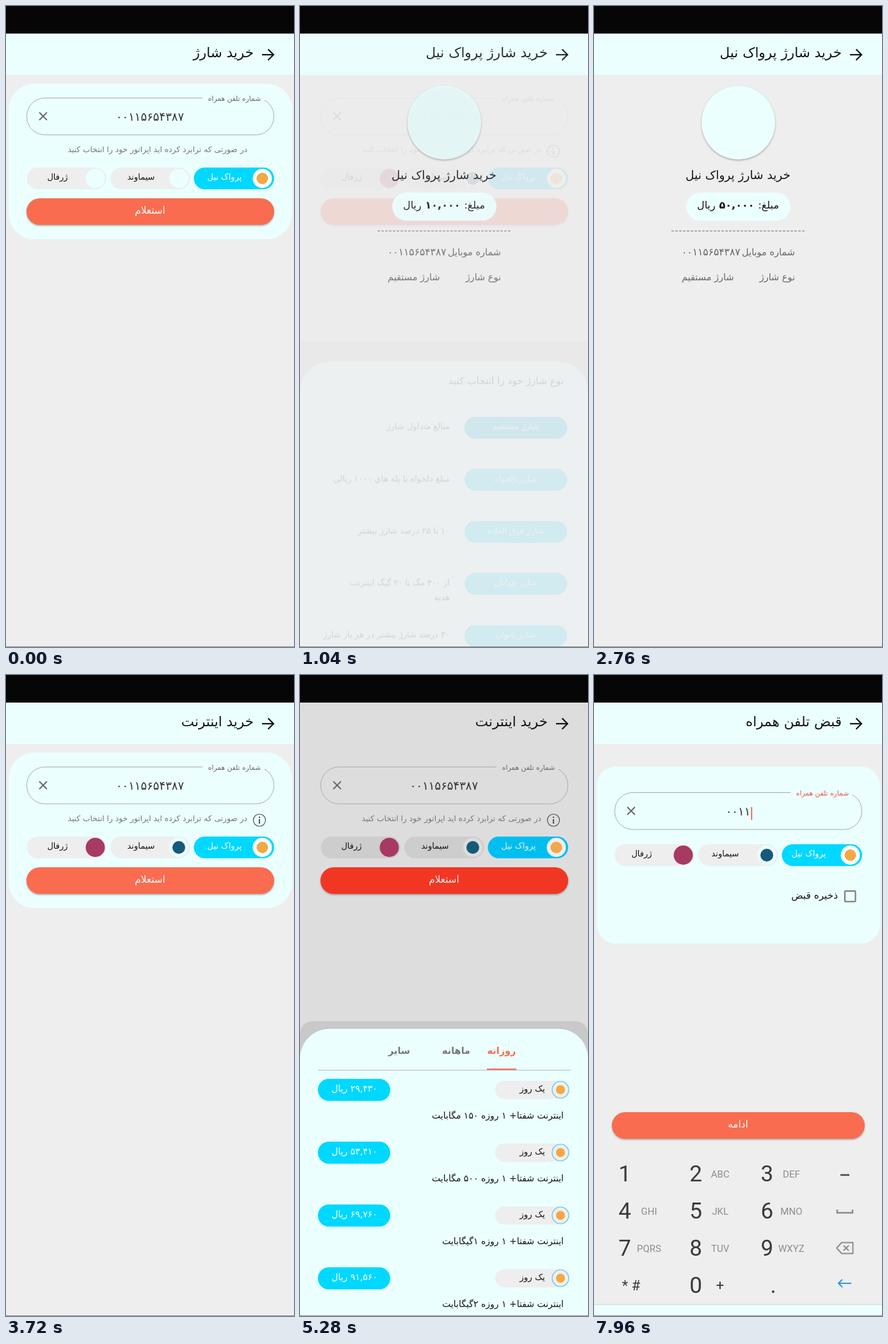
Animation of 450 by 1000 pixels, one loop 8 s. Source, as an HTML page with a canvas:

```html
<!DOCTYPE html>
<html lang="fa">
<head>
<meta charset="utf-8">
<style>
  html, body { margin: 0; height: 100%; overflow: hidden; background: #eee; }
  canvas { display: block; }
</style>
</head>
<body>
<canvas id="stage" width="450" height="1000"></canvas>
<script>
const ctx = document.getElementById('stage').getContext('2d');
const LOOP = 8000, CYAN = '#00d8ff', CORAL = '#f96c4f', AMBER = '#f2a845';
const PHONE = '۰۰۱۱۵۶۵۴۳۸۷', OPERATOR = 'پرواک نیل';

// Colours of a page at rest, behind a sheet, and behind a loader
const PLAIN = { surface: '#ebffff', ground: '#eeeeee', chip: '#eeeeee', accent: '#00d8ff', button: '#f96c4f', on: '#ffffff', ink: '#151515' };
const BEHIND = { surface: '#dddddd', ground: '#dddddd', chip: '#cdcdcd', accent: '#00bff0', button: '#f23624', on: '#eeeeee', ink: '#151515' };
const DARK = { surface: '#cccccc', ground: '#cccccc', chip: '#cccccc', accent: '#25b5d8', button: '#d2606e', on: '#dddddd', ink: '#333333' };
const BILL = { ...BEHIND, surface: '#eeeeee' };
const SHEET_DARK = { ...PLAIN, surface: '#dedede', accent: '#25c8f0', button: '#ee686a', on: '#eeeeee', ink: '#333333' };

const lerp = (a, b, p) => a + (b - a) * p;
const step = (t, a, b) => 1 - (1 - Math.min(1, Math.max(0, (t - a) / (b - a)))) ** 3;
const within = (t, a, b) => t >= a && t < b;
const channels = hex => [1, 3, 5].map(i => parseInt(hex.substr(i, 2), 16));
function blend(a, b, p) {
  const to = channels(b);
  return '#' + channels(a).map((v, i) => Math.round(lerp(v, to[i], p)).toString(16).padStart(2, '0')).join('');
}
const blendAll = (a, b, p) => Object.fromEntries(Object.keys(a).map(k => [k, blend(a[k], b[k], p)]));

function text(s, x, y, size, color = '#151515', align = 'center', weight = 400, family = '"DejaVu Sans"') {
  ctx.font = `${weight} ${size}px ${family}, sans-serif`;
  ctx.textAlign = align;
  ctx.fillStyle = color;
  ctx.fillText(s, x, y);
}
function box(x, y, w, h, r, fill, stroke, width = 1) {
  ctx.beginPath();
  ctx.roundRect(x, y, w, h, r);
  if (fill) { ctx.fillStyle = fill; ctx.fill(); }
  if (stroke) { ctx.strokeStyle = stroke; ctx.lineWidth = width; ctx.stroke(); }
}
function disc(x, y, r, fill, stroke, width = 1) { box(x - r, y - r, 2 * r, 2 * r, r, fill, stroke, width); }
function line(points, color, width) {
  ctx.beginPath();
  points.forEach(([x, y]) => ctx.lineTo(x, y));
  ctx.strokeStyle = color;
  ctx.lineWidth = width;
  ctx.stroke();
}
function shaded(draw) {
  ctx.shadowColor = 'rgba(0,0,0,.3)';
  ctx.shadowBlur = 3;
  ctx.shadowOffsetY = 1.5;
  draw();
  ctx.shadowColor = 'transparent';
}
function ripple(x, y, w, h, cx, cy, r, color) {
  if (r <= 0) return;
  ctx.save();
  ctx.beginPath();
  ctx.roundRect(x, y, w, h, h / 2);
  ctx.clip();
  disc(cx, cy, r, color);
  ctx.restore();
}

function header(title, c) {
  box(0, 42, 450, 958, 0, c.ground);
  box(0, 42, 450, 65.5, 0, c.surface);
  text(title, 387, 74, 21.5, c.ink, 'right');
  line([[400, 76], [418, 76]], c.ink, 2.2);
  line([[409.5, 67.5], [418, 76], [409.5, 84.5]], c.ink, 2.2);
}
function field(y, value, c, focused) {
  box(32.5, y + .5, 386, 57.5, 28, null, '#aaa');
  box(307, y - 2, 100, 6, 0, c.surface);
  text('شماره تلفن همراه', 357, y + 2, 10.7, focused ? '#f0503c' : '#666');
  text(value, 225, y + 31, 18, '#333');
  if (focused) {
    const x = 226 + ctx.measureText(value).width / 2;
    line([[x + 1, y + 23], [x + 1, y + 43]], '#f0503c', 1.6);
  }
  line([[52, y + 23], [64, y + 35]], '#666', 1.8);
  line([[64, y + 23], [52, y + 35]], '#666', 1.8);
}
function operators(y, c, loaded, shift = 0) {
  const list = [[32.5, 'ژرفال', '#a63a62', 15], [163, 'سیماوند', '#155a7a', 10], [293.5, OPERATOR, AMBER, 9]];
  list.forEach(([x, name, color, size], i) => {
    const chosen = i === 2;
    box(x, y, chosen ? 125.5 : 124.5, 34, 17, chosen ? c.accent : c.chip);
    text(name, x + 48 - shift, y + 16, 13, chosen ? c.on : c.ink);
    disc(x + 107, y + 17, 15, chosen ? c.on : c.surface);
    if (loaded || chosen) disc(x + 107, y + 17, size, color);
  });
}
function button(label, x, y, w, c, press = 0) {
  shaded(() => box(x, y, w, 41.5, 20.7, c.button));
  if (press > 0 && press < 1) ripple(x, y, w, 41.5, 225, y + 20, 200 * press, '#f23624');
  text(label, 225, y + 20.5, 15.3, c.on);
}
function spinner(t) {
  const turn = (t - 4440) / 420 * 2 * Math.PI;
  ctx.beginPath();
  ctx.arc(225.5, 523, 34.5, turn - 1.05, turn + 3.84);
  ctx.strokeStyle = '#ff5233';
  ctx.lineWidth = 4.2;
  ctx.stroke();
}
function sheet(top, shown, color, halo, glow, bend, draw) {
  if (shown <= 0) return;
  ctx.save();
  ctx.translate(0, (1000 - top) * (1 - shown));
  box(0, top - glow, 450, 1000, bend, halo);
  box(0, top, 450, 1000 - top + 50, [46, 46, 0, 0], color);
  draw();
  ctx.restore();
}

function inquiry(title, c, loaded, press) {
  header(title, c);
  box(4, 121, 443, 243, 40, c.surface);
  field(143, PHONE, c);
  text('در صورتی که ترابرد کرده اید اپراتور خود را انتخاب کنید', 377, 225, 12.25, '#777', 'right');
  if (loaded) {
    disc(396, 226.5, 9.5, null, '#555', 1.2);
    line([[396, 225], [396, 232]], '#555', 2);
    line([[396, 221], [396, 223]], '#555', 2);
  }
  operators(252, c, loaded);
  button('استعلام', 32, 300, 387, c, press);
}

function topUp(t) {
  const shown = step(t, 480, 660);
  inquiry('خرید شارژ', blendAll(PLAIN, BEHIND, shown), t >= 80, step(t, 280, 460));
  if (within(t, 400, 500)) spinner(t);
  sheet(555, shown, PLAIN.surface, '#c9c9c9', 32, 0, () => {
    text('نوع شارژ خود را انتخاب کنید', 412, 586, 15.3, '#151515', 'right');
    const kinds = [
      ['شارژ مستقیم', 'مبالغ متداول شارژ'],
      ['شارژ دلخواه', 'مبلغ دلخواه با پله هاي ۱۰۰۰ ريالي'],
      ['شارژ فوق العاده', '۱۰ تا ۲۵ درصد شارژ بیشتر'],
      ['شارژ جوانان', 'از ۳۰۰ مگ تا ۲۰ گیگ اینترنت', 'هدیه'],
      ['شارژ بانوان', '۳۰ درصد شارژ بیشتر در هر بار شارژ']
    ];
    kinds.forEach(([name, ...notes], i) => {
      const y = 641 + 81.2 * i;
      box(257, y, 160.5, 34, 17, CYAN);
      if (!i) ripple(257, y, 160.5, 34, 386, 646, (t - 680) * 1.2, '#00b6ec');
      text(name, 337, y + 16, 13, '#fff');
      notes.forEach((note, k) => text(note, 234, y + 16 + 23 * k, 13, '#151515', 'right'));
    });
  });
}

function invoice(t) {
  const shown = step(t, 1200, 1400) - step(t, 2480, 2660);
  const c = blendAll(PLAIN, BILL, shown);
  header('خرید شارژ ' + OPERATOR, c);
  shaded(() => disc(225.5, 182, 57.5, c.surface));
  text('خرید شارژ ' + OPERATOR, 225, 265, 18.5);
  box(144, 291, 163, 44, 22, c.surface);
  text('مبلغ:', 289, 312, 16, '#151515', 'right');
  text(t < 1600 ? '۱۰,۰۰۰' : '۵۰,۰۰۰', 223, 312, 16, '#151515', 'center', 700);
  text('ریال', 161, 312, 16, '#151515', 'left');
  ctx.setLineDash([4, 2]);
  line([[121, 351], [330, 351]], '#999', 1.5);
  ctx.setLineDash([]);
  text('شماره موبایل', 314, 385, 14.5, '#666', 'right');
  text(PHONE, 137, 385, 15.5, '#666', 'left');
  text('نوع شارژ', 314, 424, 14.5, '#666', 'right');
  text('شارژ مستقیم', 137, 424, 14.5, '#666', 'left');
  sheet(795, shown, PLAIN.surface, '#c9c9c9', 10, 50, () => {
    const chosen = t < 1600 ? 0 : 2;
    ['۱۰,۰۰۰', '۲۰,۰۰۰', '۵۰,۰۰۰', '۱۰۰,۰۰۰', '۲۰۰,۰۰۰', '۵۰۰,۰۰۰'].forEach((sum, i) => {
      const x = i % 2 ? 49 : 244.5, y = 821 + 46 * (i >> 1);
      box(x, y, 158, 33.5, 17, i === chosen ? CYAN : null, '#38cbe6', 1.2);
      text(sum + ' ریال', x + 78.5, y + 16, 14.8);
    });
    button('ادامه', 28, 964, 395, PLAIN, step(t, 2360, 2480));
  });
}

function internet(t) {
  const shown = step(t, 4100, 4270) - step(t, 5400, 5580);
  const busy = step(t, 4340, 4430) - step(t, 4960, 5060);
  inquiry('خرید اینترنت', blendAll(blendAll(PLAIN, BEHIND, shown), DARK, busy), true, step(t, 3840, 4000));
  const c = blendAll(PLAIN, SHEET_DARK, busy);
  sheet(552, shown, c.surface, blend('#c9c9c9', '#b2b2b2', busy), 12, 20, () => {
    text('روزانه', 315, 587, 14.5, c.button, 'center', 700);
    text('ماهانه', 244, 587, 14.5, '#777', 'center', 700);
    text('سایر', 155, 587, 14.5, '#777', 'center', 700);
    line([[28, 616.5], [423, 616.5]], '#bbb', 1);
    line([[292, 615], [338, 615]], c.button, 2);
    const packs = [['۲۹,۴۳۰', '۱۵۰ مگابایت'], ['۵۳,۴۱۰', '۵۰۰ مگابایت'], ['۶۹,۷۶۰', '۱گیگابایت'], ['۹۱,۵۶۰', '۲گیگابایت']];
    packs.forEach(([price, size], i) => {
      const y = 630 + 98 * i;
      box(28, y, 113, 34.5, 17, c.accent);
      text(price + ' ریال', 85, y + 16.5, 14, c.on);
      box(305, y + 3, 115, 28.5, 14, c.chip);
      text('یک روز', 363, y + 16.5, 13.5);
      disc(407, y + 17, 13, c.chip, '#4cc8dc', 1.2);
      disc(407, y + 17, 7, AMBER);
      text('اینترنت شفتا+ ۱ روزه ' + size, 412, y + 58, 14, c.ink, 'right');
    });
  });
  if (within(t, 3980, 4100) || within(t, 4360, 4980)) spinner(t);
}

function bills() {
  header('قبض', PLAIN);
  box(4, 130, 443, 454, 22, PLAIN.surface);
  [['موبایل', 335.5, 197], ['تلفن ثابت', 115.5, 197], ['آب', 335.5, 330], ['برق', 115.5, 330], ['گاز', 335.5, 463]].forEach(([name, x, y], i) => {
    disc(x, y, 39.5, PLAIN.ground);
    ctx.beginPath();
    ctx.arc(x, y - 3, 38, .7, 2.45);
    ctx.strokeStyle = '#d8d8d8';
    ctx.lineWidth = 2;
    ctx.stroke();
    if (!i) disc(x, y - 2, 12, AMBER);
    text('قبض ' + name, x, y + 67, 15.6);
  });
  box(5, 597, 441, 73, 22, '#45cdcd');
  text('با انتخاب قبض اول و کلیک بر روی دکمه افزودن قبض قبوض', 225, 621, 14.4);
  text('خود را دسته جمعی پرداخت کنید', 225, 645, 14.4);
  shaded(() => box(135, 935, 181, 51.5, 26, CORAL));
  text('قبوض ذخیره شده', 266, 960, 14.5, '#fff', 'right');
  ctx.beginPath();
  [[276, 950], [292, 950], [292, 971], [284, 967], [276, 971]].forEach(p => ctx.lineTo(...p));
  ctx.fillStyle = '#fff';
  ctx.fill();
}

function keypad() {
  const font = 'Roboto', grey = '#8c8c8c';
  const letters = ['', 'ABC', 'DEF', 'GHI', 'JKL', 'MNO', 'PQRS', 'TUV', 'WXYZ'];
  ctx.direction = 'ltr';
  box(0, 745, 450, 255, 0, PLAIN.ground);
  letters.forEach((word, i) => {
    const x = 48 + 111.2 * (i % 3), y = 780 + 58 * Math.floor(i / 3);
    text(i + 1, x, y, 35, '#3a3a3a', 'center', 400, font);
    text(word, x + 38, y, 15, grey, 'center', 400, font);
  });
  text('* #', 58, 954, 22, '#3a3a3a', 'center', 400, font);
  text('0', 159.2, 954, 35, '#3a3a3a', 'center', 400, font);
  text('+', 197, 954, 22, '#3a3a3a', 'center', 400, font);
  text('.', 280, 954, 35, '#3a3a3a', 'center', 400, font);
  line([[385, 780], [399, 780]], '#444', 2.5);
  line([[380, 834], [380, 839], [404, 839], [404, 834]], grey, 2.5);
  line([[379, 894], [387, 885.5], [404.5, 885.5], [404.5, 902.5], [387, 902.5], [379, 894]], grey, 2);
  line([[390, 890], [398, 898]], grey, 2);
  line([[398, 890], [390, 898]], grey, 2);
  line([[402, 949], [382, 949]], '#3399dd', 2);
  line([[388, 943], [382, 949], [388, 955]], '#3399dd', 2);
  box(0, 982, 450, 18, 0, PLAIN.surface);
  line([[0, 982], [450, 982]], '#ccc', 1);
  ctx.direction = 'rtl';
}

function mobileBill(t) {
  const raised = step(t, 7080, 7320);
  const typed = [7620, 7710, 7800, 7890].filter(at => t >= at).length;
  header('قبض تلفن همراه', PLAIN);
  box(4, 143, 443, 276, 30, PLAIN.surface);
  field(183, PHONE.slice(0, typed), PLAIN, raised > 0);
  operators(264, PLAIN, t >= 6900, 6);
  box(392, 337, 16.5, 16.5, 1, null, '#777', 2);
  text('ذخیره قبض', 381, 345, 15.3, '#151515', 'right');
  button('ادامه', 28, lerp(940, 682, raised), 395, PLAIN);
  if (raised > 0) {
    ctx.save();
    ctx.translate(0, 255 * (1 - raised));
    keypad();
    ctx.restore();
  }
}

const pages = [[-200, topUp], [960, invoice], [3400, internet], [6280, bills], [6760, mobileBill]];
function draw(t) {
  ctx.direction = 'rtl';
  ctx.textBaseline = 'middle';
  pages.forEach(([start, page], i) => {
    const next = pages[i + 1];
    if (t < start || next && t >= next[0] + 160) return;
    ctx.globalAlpha = step(t, start, start + 160);
    page(t);
  });
  ctx.globalAlpha = 1;
  box(0, 0, 450, 43, 0, '#060606');
  line([[0, 999.5], [450, 999.5]], '#8a8f8f', 1);
}
const began = performance.now();
function frame() {
  draw((performance.now() - began) % LOOP);
  requestAnimationFrame(frame);
}
frame();
</script>
</body>
</html>
```
